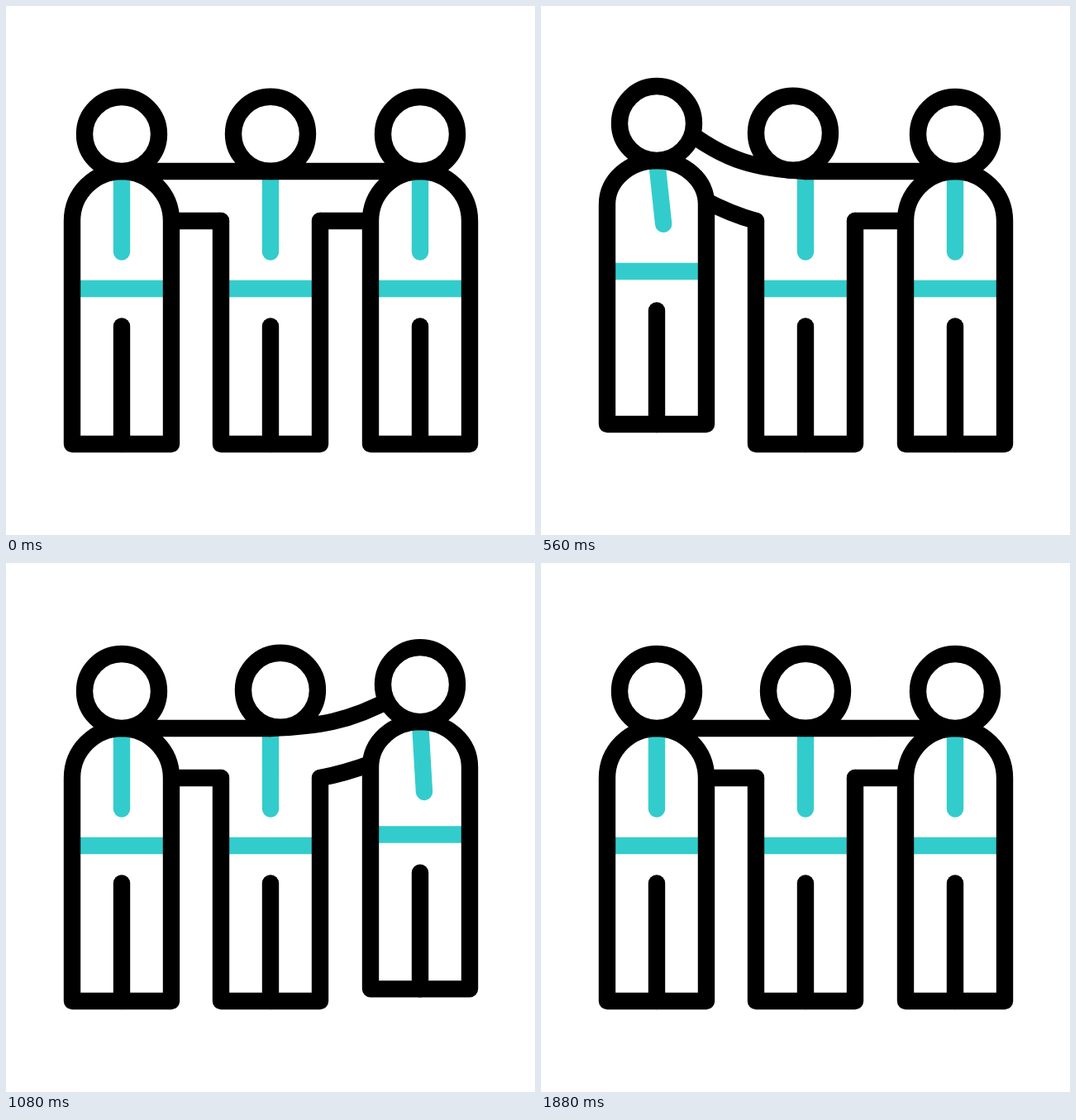
Recreate the animation shown at these times as an HTML page with a canvas. Size 640 by 640 pixels, loop 2 s.

```html
<!DOCTYPE html>
<html>
<head>
<meta charset="utf-8">
<title>Three friends</title>
<style>
html, body { margin: 0; width: 100%; height: 100%; overflow: hidden; background: #fff; }
canvas { display: block; }
</style>
</head>
<body>
<canvas id="stage" width="640" height="640"></canvas>
<script>
const ctx = document.getElementById('stage').getContext('2d');
const BLACK = '#000', TEAL = '#33cccc';
const LOOP = 2000, STEP = 40;

const progress = (t, from, to) => Math.min(1, Math.max(0, (t - from) / (to - from)));
const ease = (t, from, to) => {
  const u = progress(t, from, to);
  return u * u * (3 - 2 * u);
};
// Rises and falls once between two times
const swing = (t, from, to) => Math.sin(Math.PI * progress(t, from, to)) ** 2;

function stroke(color, path, cap = 'round') {
  ctx.strokeStyle = color;
  ctx.lineCap = cap;
  ctx.stroke(path);
}

function line(color, x1, y1, x2, y2, cap) {
  stroke(color, new Path2D(`M${x1} ${y1}L${x2} ${y2}`), cap);
}

function filled(path) {
  ctx.fill(path);
  stroke(BLACK, path);
}

function head(x, y) {
  const ring = new Path2D();
  ring.arc(x, y, 45, 0, 2 * Math.PI);
  filled(ring);
}

// The body squashes as it rises: the feet lift most, the head least
function sidePerson(x, lift, tieSide) {
  const top = 200 - 0.54 * lift;
  const shoulder = 260 - lift + 0.007 * lift * lift;
  const belt = 342 - lift + 0.0052 * lift * lift;
  const legs = 387.5 - lift + 0.0088 * lift * lift;
  const foot = 530 - lift;
  const body = new Path2D(
    `M${x - 60} ${foot}V${shoulder}A60 ${shoulder - top} 0 0 1 ${x + 60} ${shoulder}V${foot}Z`);
  ctx.fill(body);
  line(TEAL, x, top, x + tieSide * 0.34 * lift, 297.5 - 1.4 * lift);
  line(TEAL, x - 60, belt, x + 60, belt, 'butt');
  line(BLACK, x, legs, x, foot);
  stroke(BLACK, body);
  head(x, 155 - 0.54 * lift);
}

// side is -1 for the left arm, 1 for the right; raise is 0 when level
function arm(side, raise) {
  const at = (dx, y, up) => `${320 + side * dx} ${y - up * raise} `;
  stroke(BLACK, new Path2D(
    'M' + at(0, 200, 0) + 'C' + at(55, 200, 3) + at(95, 200, 10) + at(150, 200, 54)));
  stroke(BLACK, new Path2D(
    'M' + at(60, 260, 0) + 'Q' + at(90, 260, 8) + at(124, 260, 26)));
}

function middlePerson(left, right, tie) {
  line(TEAL, 320, 200, 320 + tie, 297.5);
  line(TEAL, 260, 342, 380, 342, 'butt');
  line(BLACK, 320, 387.5, 320, 530);
  stroke(BLACK, new Path2D('M260 260V530H380V260'));
  arm(-1, left);
  arm(1, right * 0.7);
  head(320 - 15 * left + 12 * right, 154.8 - Math.min(1, left + right));
}

function draw(t) {
  const across = ease(t, 620, 1090);
  const left = ease(t, 0, 350) - across;
  const right = across - ease(t, 1520, 1890);
  const tie = 15 * swing(t, 620, 1090) - 10 * swing(t, 0, 350) - 10 * swing(t, 1520, 1890);
  const liftLeft = 29.3 * (ease(t, 370, 630) - ease(t, 630, 880));
  const liftRight = 29.3 * (ease(t, 960, 1200) - ease(t, 1200, 1440));

  ctx.fillStyle = '#fff';
  ctx.fillRect(0, 0, 640, 640);
  ctx.lineWidth = 20.4;
  ctx.lineJoin = 'round';
  middlePerson(left, right, tie);
  sidePerson(140, liftLeft, 1);
  sidePerson(501, liftRight, 1);
}

const start = performance.now();
function tick() {
  const t = (performance.now() - start) % LOOP;
  draw(Math.floor(t / STEP) * STEP);
  requestAnimationFrame(tick);
}
tick();
</script>
</body>
</html>
```
